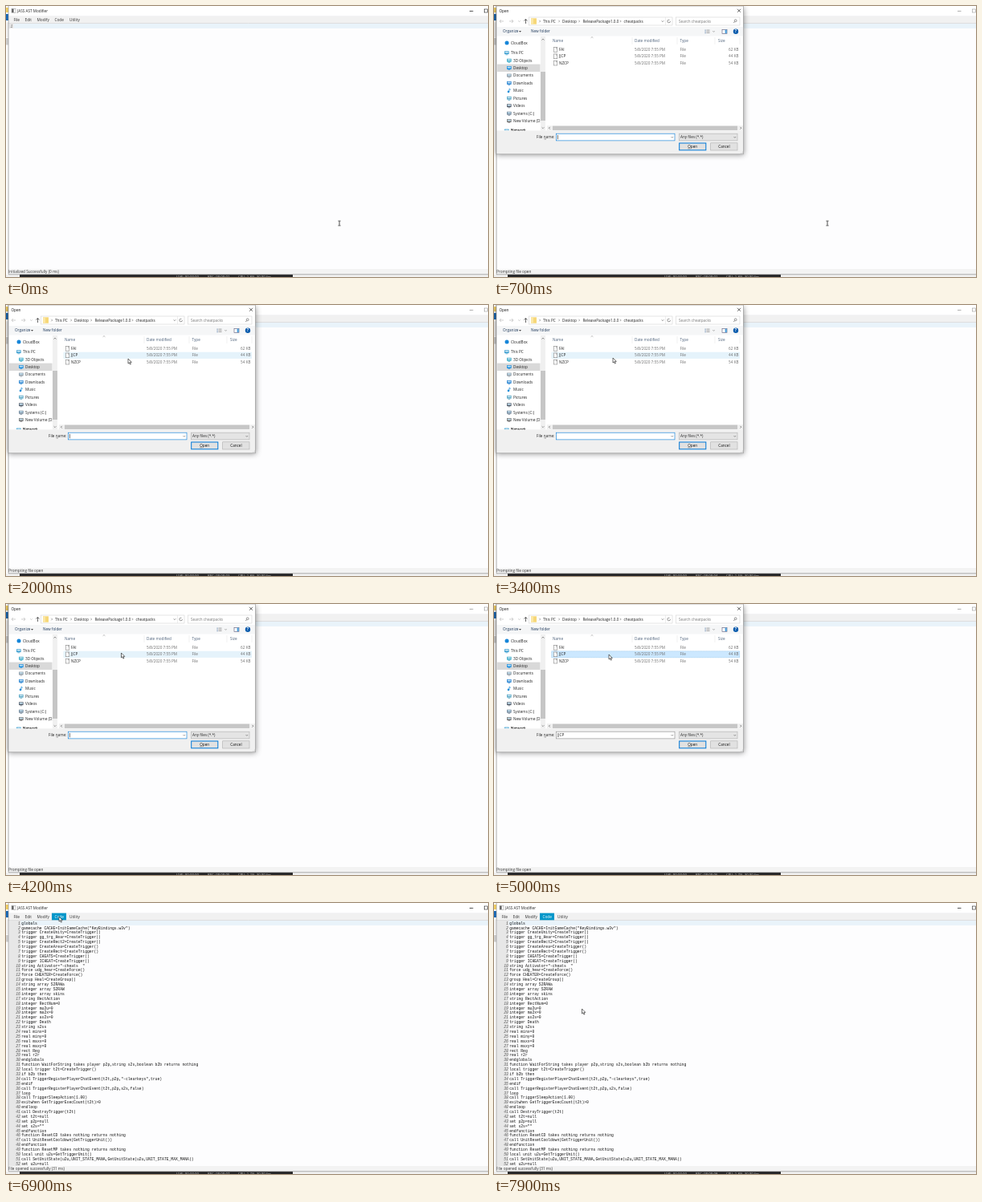
An HTML page with a canvas that plays this animation: 600 px wide and 338 px high, repeating every 8000 ms.

```html
<!DOCTYPE html>
<html lang="en">
<head>
<meta charset="utf-8">
<title>JASS AST Modifier</title>
<style>
html, body { margin: 0; width: 100%; height: 100%; overflow: hidden; background: #fff; }
canvas { display: block; width: 600px; height: 338px; }
</style>
</head>
<body>
<canvas id="stage" width="600" height="338"></canvas>
<script>
const ctx = document.getElementById('stage').getContext('2d');
const LOOP = 8000;
const UI = '"Open Sans", "Noto Sans", sans-serif';
const MONO = '"Liberation Mono", "DejaVu Sans Mono", monospace';
const OPENS = 300, PICKED = 4700, CLOSES = 5250;

const CODE = `globals
gamecache CACHE=InitGameCache("KeyBindings.w3v")
trigger CreateUnity=CreateTrigger()
trigger gg_trg_Hear=CreateTrigger()
trigger CreateRect2=CreateTrigger()
trigger CreateArea=CreateTrigger()
trigger CreateRect=CreateTrigger()
trigger CHEATS=CreateTrigger()
trigger ICHEAT=CreateTrigger()
string Activator="-cheats  "
force udg_hear=CreateForce()
force CHEATER=CreateForce()
group Heal=CreateGroup()
string array S2RAWa
integer array S2RAW
integer array skins
string RectAction
integer RectNum=0
integer mu2u=0
integer ma2x=0
integer as2s=0
trigger Death
string s2ss
real minx=0
real miny=0
real maxx=0
real maxy=0
rect Reg
real r2r
endglobals
function WaitForString takes player p2p,string s2s,boolean b2b returns nothing
local trigger t2t=CreateTrigger()
if b2b then
call TriggerRegisterPlayerChatEvent(t2t,p2p,"-clearkeys",true)
endif
call TriggerRegisterPlayerChatEvent(t2t,p2p,s2s,false)
loop
call TriggerSleepAction(1.00)
exitwhen GetTriggerExecCount(t2t)>0
endloop
call DestroyTrigger(t2t)
set t2t=null
set p2p=null
set s2s=""
endfunction
function ResetCD takes nothing returns nothing
call UnitResetCooldown(GetTriggerUnit())
endfunction
function ResetMP takes nothing returns nothing
local unit u2u=GetTriggerUnit()
call SetUnitState(u2u,UNIT_STATE_MANA,GetUnitState(u2u,UNIT_STATE_MAX_MANA))
set u2u=null`.split('\n');

const FILES = [['FAI', '62 KB'], ['JJCP', '44 KB'], ['NZCP', '54 KB']];
// label, centre y, indent, icon colour
const PLACES = [
  ['CloudBox', 46, 21, '#1686d9'], ['This PC', 58.5, 21, '#3c9fd0'],
  ['3D Objects', 68, 24, '#35a9c6'], ['Desktop', 77.3, 24, '#1c8fe0'],
  ['Documents', 86.8, 24, '#8d9aa5'], ['Downloads', 96.2, 24, '#2a84d2'],
  ['Music', 105.6, 24, '#2390d8'], ['Pictures', 115, 24, '#58a7c4'],
  ['Videos', 124.5, 24, '#596370'], ['Systems (C:)', 134, 24, '#6d8296'],
  ['New Volume (D:)', 143.3, 24, '#777'], ['Network', 155.8, 21, '#3c9fd0']
];

// time, x, y of the pointer tip
const PATH = [
  [0, 415, 271], [900, 415, 271], [1250, 318, 176], [1750, 166, 78], [2000, 152, 67],
  [2400, 148, 66], [3600, 148, 66], [4000, 143.5, 61], [4200, 143.5, 61], [4500, 143, 63],
  [5350, 143, 63], [5800, 103, 53], [5950, 103, 53], [6450, 66, 15], [6900, 66, 17],
  [7350, 66, 17], [7850, 109.5, 132], [8000, 109.5, 132]
];

function rect(x, y, w, h, fill, edge) {
  if (fill) { ctx.fillStyle = fill; ctx.fillRect(x, y, w, h); }
  if (edge) { ctx.strokeStyle = edge; ctx.lineWidth = 0.6; ctx.strokeRect(x, y, w, h); }
}

function line(color, width, ...pts) {
  ctx.strokeStyle = color;
  ctx.lineWidth = width;
  ctx.beginPath();
  for (let i = 0; i < pts.length; i += 2) ctx.lineTo(pts[i], pts[i + 1]);
  ctx.stroke();
}

function disc(x, y, r, fill) {
  ctx.fillStyle = fill;
  ctx.beginPath();
  ctx.arc(x, y, r, 0, 7);
  ctx.fill();
}

// Small type is set large and scaled down so that spacing stays exact.
function text(s, x, y, color = '#222', size = 4.65, align = 'left', font = UI, style = '') {
  ctx.save();
  ctx.translate(x, y + size * 0.35);
  ctx.scale(size / 40, size / 40);
  ctx.font = `${style} 40px ${font}`;
  ctx.textAlign = align;
  ctx.fillStyle = color;
  ctx.fillText(s, 0, 0);
  ctx.restore();
}

function clip(x, y, w, h, draw) {
  ctx.save();
  ctx.beginPath();
  ctx.rect(x, y, w, h);
  ctx.clip();
  draw();
  ctx.restore();
}

const chevron = (x, y, r, color = '#555') => line(color, 0.6, x - r, y - r / 2, x, y + r / 2, x + r, y - r / 2);
const arrowRight = (x, y) => line('#666', 0.6, x - 0.6, y - 1.3, x + 0.7, y, x - 0.6, y + 1.3);

function pointer(t) {
  let i = 1;
  while (i < PATH.length - 1 && PATH[i][0] < t) i++;
  const [t0, x0, y0] = PATH[i - 1], [t1, x1, y1] = PATH[i];
  const p = Math.min(1, (t - t0) / (t1 - t0)), e = p * p * (3 - 2 * p);
  return [x0 + (x1 - x0) * e, y0 + (y1 - y0) * e];
}

function backdrop(t) {
  rect(0, 0, 600, 338, '#fff');
  rect(0, 2, 3, 6, '#f3cf62');
  rect(0, 10, 3, 8, '#1566b5');
  rect(0, 21, 3, 18, '#f4f4f4');
  rect(0, 40, 3, 8.5, '#cfcfcf');
  rect(0, 335, 600, 3, '#f1f1f1');
  rect(17, 334.5, 340, 3.5, '#242426');
  const s = 1 + Math.floor(t / 1000);
  const cpu = [1.8, 1.8, 1.8, 1.5, 1.2, 1.7, 1.7, 1.8][s - 1];
  clip(17, 335, 340, 3, () => {
    text('LIVE: 00:00:00', 212, 337.6, '#ccc', 4.35);
    text('REC: 00:00:0' + s, 251, 337.6, '#ccc', 4.35);
    text(`CPU: ${cpu}%, 30.00 fps`, 289, 337.6, '#ccc', 4.35);
  });
}

function mainWindow(t, active, loaded, inCode) {
  rect(3, 0, 597, 335, '#fdfdfe');
  rect(3, 0, 597, 12.3, '#fff');
  rect(3, 12.3, 597, 9.2, '#f1f1f1');
  line('#c9c9c9', 0.6, 3, 21.6, 600, 21.6);
  rect(7, 3.3, 5, 5, '#fff', '#999');
  rect(7.3, 3.6, 2.2, 4.4, '#555');
  text('JASS AST Modifier', 14, 6.1, '#222');
  const mark = active ? '#222' : '#999';
  line(mark, 0.8, 577, 6.4, 581.5, 6.4);
  rect(595.3, 4, 4, 4, null, mark);

  if (inCode) rect(57, 12.6, 18, 8.7, '#0096c9');
  [['File', 9.5], ['Edit', 23.5], ['Modify', 38.5], ['Code', 60.5], ['Utility', 79]].forEach(([s, x]) =>
    text(s, x, 17, inCode && s === 'Code' ? '#fff' : '#333', 4.75));

  const edge = loaded ? 18.2 : 9.4;
  rect(edge, 22, 600 - edge, 5.9, '#e9f3fa');
  rect(3.5, 22, edge - 3.5, loaded ? 306 : 5.9, '#e7e7e7');
  if (loaded) {
    clip(3, 22, 597, 306, () => CODE.forEach((s, i) => {
      const y = 25 + i * 5.885;
      text(i + 1, 17.9, y, '#555', 4.7, 'right', MONO, 'italic');
      text(s, 19.2, y, '#111', 4.7, 'left', MONO);
    }));
  } else {
    text('1', 8.4, 25, '#666', 4.7, 'right', MONO, 'italic');
  }

  rect(3, 328, 597, 7, '#f3f3f3');
  const status = loaded ? 'File opened successfully (31 ms)'
    : t < 200 ? 'Initialized Successfully (0 ms)' : 'Prompting file open';
  text(status, 3, 331.5, '#333', 4.7);
  line('#8b8b8b', 0.7, 3, 0, 3, 334.8, 600, 334.8);
}

function folderBar() {
  line('#bbb', 0.7, 12, 19, 7, 19);
  line('#bbb', 0.7, 9, 17, 7, 19, 9, 21);
  line('#bbb', 0.7, 19, 19, 24, 19);
  line('#bbb', 0.7, 22, 17, 24, 19, 22, 21);
  chevron(31.5, 19, 1.3, '#aaa');
  line('#444', 0.8, 39.5, 22, 39.5, 16.5);
  line('#444', 0.8, 37.5, 18.5, 39.5, 16.5, 41.5, 18.5);

  rect(43.5, 14, 178.5, 10, '#fff', '#d4d4d4');
  rect(46, 15.3, 7, 7.4, '#f6d778');
  rect(46, 15.3, 3, 7.4, '#fbe7a5');
  [57, 81, 106, 157.5].forEach(x => arrowRight(x, 19));
  [['This PC', 61], ['Desktop', 85], ['ReleasePackage1.0.0', 110.5], ['cheatpacks', 161.5]].forEach(([s, x]) =>
    text(s, x, 19));
  chevron(210, 19, 1.4);
  line('#ddd', 0.5, 213.5, 14, 213.5, 24);
  ctx.strokeStyle = '#555';
  ctx.lineWidth = 0.6;
  ctx.beginPath();
  ctx.arc(217.7, 19, 1.8, 0, 5.2);
  ctx.stroke();

  rect(226.5, 14, 79.5, 10, '#fff', '#d4d4d4');
  text('Search cheatpacks', 230, 19, '#777');
  ctx.strokeStyle = '#555';
  ctx.beginPath();
  ctx.arc(300.7, 18.3, 1.4, 0, 7);
  ctx.stroke();
  line('#555', 0.7, 299.7, 19.4, 298.3, 21);

  rect(3.5, 26, 307, 11.5, '#f5f6f7');
  text('Organize', 11, 31.8, '#1e395b');
  ctx.fillStyle = '#444';
  ctx.beginPath();
  ctx.moveTo(31, 31); ctx.lineTo(34, 31); ctx.lineTo(32.5, 32.8);
  ctx.fill();
  text('New folder', 46, 31.8, '#1e395b');
  for (let i = 0; i < 3; i++) {
    rect(262.5, 29.6 + i * 1.8, 1.2, 1, '#6b8bb0');
    rect(264.5, 29.6 + i * 1.8, 4, 0.8, '#999');
  }
  chevron(273.5, 31.8, 1);
  rect(284, 29.3, 6, 5, '#fff', '#557');
  rect(287.6, 29.6, 2.2, 4.5, '#4ba0dc');
  disc(301, 31.8, 3.2, '#0b5cad');
  text('?', 301, 31.8, '#fff', 4.8, 'center', UI, 'bold');
}

function places() {
  clip(4, 38, 53.5, 117.3, () => {
    rect(4, 72.6, 54, 9.4, '#d9d9d9');
    PLACES.forEach(([s, y, x, color], i) => {
      if (i === 0) disc(16, y, 2.5, color);
      else if (s === 'Music') {
        disc(18, y + 1.3, 1.3, color);
        line(color, 0.8, 19, y + 1, 19, y - 2.4, 20.8, y - 1.2);
      } else {
        rect(x - 8, y - 2.2, 5.6, 3.8, color);
        rect(x - 7.2, y - 1.5, 4, 1.6, '#c5e3f3');
        rect(x - 6.6, y + 2, 2.8, 0.7, color);
      }
      text(s, x, y);
    });
  });
  rect(58, 38, 6, 117.3, '#f0f0f0');
  rect(58, 82, 6, 61, '#c6c6c6');
  line('#555', 0.7, 59.6, 42.5, 61, 41.1, 62.4, 42.5);
  chevron(61, 152, 1.4);
}

function fileList(hover, picked) {
  [['Name', 73], ['Date modified', 175], ['Type', 231.5], ['Size', 279]].forEach(([s, x]) =>
    text(s, x, 43.3, '#4c607a'));
  [172, 228, 275, 306].forEach(x => line('#e2e2e2', 0.5, x, 39, x, 48));
  line('#777', 0.5, 120.6, 39.8, 122, 38.5, 123.4, 39.8);
  FILES.forEach(([name, size], i) => {
    const y = 54.5 + i * 8.3;
    if (picked && i === 1) {
      rect(71.5, y - 4.1, 234.5, 8.2, '#cce8ff');
      ctx.setLineDash([1, 1]);
      rect(71.7, y - 4, 234, 8, null, '#86bde6');
      ctx.setLineDash([]);
    } else if (i === hover) rect(71.5, y - 4.1, 234.5, 8.2, '#e5f3fb');
    rect(74.3, y - 2.9, 4.4, 5.8, '#fff', '#888');
    line('#888', 0.5, 77.2, y - 2.9, 77.2, y - 1.5, 78.7, y - 1.5);
    text(name, 81, y);
    text('5/8/2020 7:55 PM', 175, y, '#6d6d6d');
    text('File', 231.5, y, '#6d6d6d');
    text(size, 304.5, y, '#6d6d6d', 4.65, 'right');
  });
  rect(66, 149.3, 244, 6, '#f0f0f0');
  rect(73, 149.6, 230, 5.3, '#c6c6c6');
  line('#555', 0.7, 69.7, 150.9, 68.4, 152.2, 69.7, 153.5);
  line('#555', 0.7, 306.5, 150.9, 307.8, 152.2, 306.5, 153.5);
}

function dialog(t, alpha, hover, picked) {
  ctx.save();
  ctx.globalAlpha = alpha;
  ctx.shadowColor = 'rgba(0,0,0,.45)';
  ctx.shadowBlur = 7;
  ctx.shadowOffsetY = 1.5;
  rect(3, 0, 307.5, 184.8, '#fff');
  ctx.shadowColor = 'transparent';
  text('Open', 6.5, 6, '#111');
  line('#222', 0.7, 303, 3.8, 307, 7.8);
  line('#222', 0.7, 307, 3.8, 303, 7.8);
  folderBar();
  places();
  fileList(hover, picked);

  rect(3.2, 155.4, 307.2, 29.2, '#f0f0f0');
  clip(4, 153, 53.5, 2.6, () => text('Network', 21, 155.8));
  text('File name:', 75.3, 163.5, '#222', 4.65, 'right');
  line('#222', 0.4, 62.5, 166, 65, 166);
  rect(77.5, 159.2, 147.5, 8.7, '#fff', picked ? '#8a8a8a' : '#0078d7');
  chevron(221.8, 163.7, 1.3);
  if (picked) text('JJCP', 79, 163.6);
  else if (t < 660 || Math.floor((t - 660) / 530) % 2 === 0) line('#111', 0.6, 79.4, 161, 79.4, 166.3);
  rect(230.3, 159.2, 72.7, 8.7, '#e4e4e4', '#b0b0b0');
  text('Any files (*.*)', 232, 163.5);
  chevron(299.8, 163.7, 1.3);

  rect(230.5, 170.8, 33.5, 9.2, '#e1e1e1');
  ctx.strokeStyle = '#0078d7';
  ctx.lineWidth = 1;
  ctx.strokeRect(230.7, 171, 33.1, 8.8);
  text('Open', 247.2, 175.3, '#111', 4.65, 'center');
  line('#222', 0.4, 241.3, 177.8, 244.6, 177.8);
  rect(269.7, 170.8, 33.3, 9.2, '#e1e1e1', '#adadad');
  text('Cancel', 286.4, 175.3, '#111', 4.65, 'center');
  [[309, 183.2], [307.5, 183.2], [309, 181.7]].forEach(([x, y]) => rect(x, y, 0.7, 0.7, '#aaa'));
  rect(3, 0, 307.5, 184.8, null, '#8c8c8c');
  ctx.restore();
}

function beam(x, y) {
  line('#222', 0.8, x, y - 2.7, x, y + 2.7);
  line('#222', 0.7, x - 1.6, y - 2.9, x + 1.6, y - 2.9);
  line('#222', 0.7, x - 1.6, y + 2.9, x + 1.6, y + 2.9);
}

function arrow(x, y) {
  ctx.save();
  ctx.translate(x, y);
  ctx.beginPath();
  [[0, 0], [0, 6], [1.4, 4.8], [2.4, 7.1], [3.4, 6.7], [2.4, 4.5], [4.3, 4.4]].forEach(p => ctx.lineTo(...p));
  ctx.closePath();
  ctx.fillStyle = '#fff';
  ctx.fill();
  ctx.strokeStyle = '#222';
  ctx.lineWidth = 0.65;
  ctx.stroke();
  ctx.restore();
}

const clamp = v => Math.max(0, Math.min(1, v));

function draw(t) {
  const [x, y] = pointer(t);
  const loaded = t >= CLOSES + 50;
  const alpha = clamp((t - OPENS) / 150) * clamp((CLOSES + 100 - t) / 100);
  const inCode = t > 6200 && (y < 21 || t > 6900);
  const inDialog = alpha > 0 && x < 310 && y < 185;
  const row = Math.floor((y - 50.4) / 8.45);
  backdrop(t);
  mainWindow(t, alpha === 0, loaded, inCode);
  if (alpha > 0) dialog(t, alpha, inDialog && x > 71 ? row : -1, t >= PICKED);
  if (inDialog || inCode) arrow(x, y);
  else beam(x, y);
}

function tick() {
  draw(performance.now() % LOOP);
  requestAnimationFrame(tick);
}
tick();
</script>
</body>
</html>
```
